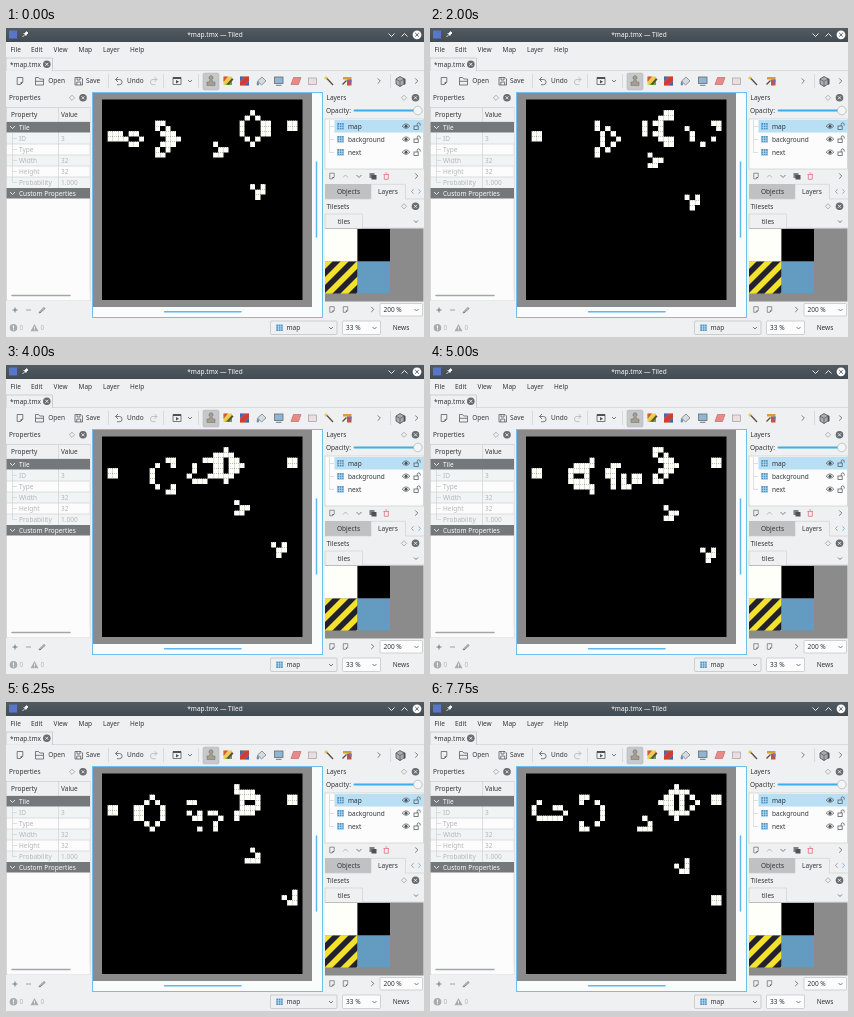
Recreate the animation shown at these times as an HTML page with a canvas. Size 418 by 309 pixels, loop 8000 ms.

```html
<!DOCTYPE html>
<html lang="en">
<head>
<meta charset="utf-8">
<title>Tile map life</title>
<style>
html, body { margin: 0; width: 100%; height: 100%; overflow: hidden; background: #eff0f1; }
svg, canvas { position: absolute; display: block; }
svg { left: 0; top: 0; }
canvas { left: 96px; top: 71px; width: 201px; height: 202px; }
text { font: 6.5px "Noto Sans", sans-serif; fill: #31363b; }
.dim text, text.dim { fill: #b4b6b8; }
text.w { fill: #fcfcfc; }
.mid { text-anchor: middle; }
.ln { fill: none; stroke: #5a5f64; stroke-width: .8; }
.soft { fill: none; stroke: #c9cbcd; stroke-width: .6; }
.box { fill: #fcfcfc; stroke: #c3c5c7; stroke-width: .6; }
.btn { fill: #eff0f1; stroke: #b4b7b9; stroke-width: .6; }
.edit { fill: #fcfcfc; stroke: #b4b7b9; stroke-width: .6; }
.row { fill: #74787b; }
</style>
</head>
<body>
<svg width="418" height="309" viewBox="0 0 418 309">
  <defs>
    <linearGradient id="bar" x2="0" y2="1">
      <stop stop-color="#525b62"/><stop offset="1" stop-color="#424b52"/>
    </linearGradient>
    <pattern id="stripes" width="16" height="16" patternUnits="userSpaceOnUse" x="319" y="233">
      <rect width="16" height="16" fill="#f3e12c"/>
      <path d="M0 8L8 0H16L0 16ZM16 8V16H8Z" fill="#22222e"/>
    </pattern>
    <g id="close">
      <circle r="3.8" fill="#676c70"/>
      <path d="M-1.5-1.5L1.5 1.5M1.5-1.5L-1.5 1.5" stroke="#fff" stroke-width=".8"/>
    </g>
    <path id="float" class="ln" d="M0-2.6L2.6 0L0 2.6L-2.6 0Z" style="stroke:#85898c;stroke-width:.6"/>
    <path id="right" class="ln" d="M-1.3-2.6L1.3 0L-1.3 2.6"/>
    <path id="down" class="ln" d="M-2-1L0 1L2-1"/>
    <g id="page">
      <path class="ln" d="M-2.8-3.5H2.8V1.2L.5 3.5H-2.8Z"/>
      <path d="M2.8 1.2H.5V3.5Z" fill="#4d5257"/>
    </g>
    <g id="grid">
      <rect x="-3.2" y="-3.2" width="6.4" height="6.4" fill="#4a90c2"/>
      <path d="M-3.2-1H3.2M-3.2 1.2H3.2M-1-3.2V3.2M1.2-3.2V3.2" stroke="#d2e9f6" stroke-width=".6"/>
    </g>
    <g id="flags">
      <path class="ln" d="M-3.8 0Q0-4.6 3.8 0Q0 4.2-3.8 0Z"/>
      <circle r="1.5" fill="#4d5257"/>
      <rect class="ln" x="8" y="-.2" width="4.2" height="3.4"/>
      <path class="ln" d="M11.2-.2V-1.8A1.5 1.5 0 0 1 14.2-1.8V-.6"/>
    </g>
  </defs>

  <rect width="418" height="309" fill="#eff0f1"/>

  <!-- title and menu -->
  <rect width="418" height="14" fill="url(#bar)"/>
  <rect x="3" y="2.5" width="8" height="8" fill="#5877c8"/>
  <path d="M16.5 9L19 6.5M17.6 5.2L20.4 8M18.6 5.6L20.6 3.6L22 5L20 7Z" stroke="#fcfcfc" stroke-width=".8" fill="#fcfcfc"/>
  <text class="w mid" x="209" y="9.2">*map.tmx — Tiled</text>
  <path d="M382.5 5.5L385.5 8.5L388.5 5.5M395.5 8.5L398.5 5.5L401.5 8.5" fill="none" stroke="#fcfcfc" stroke-width=".9"/>
  <circle cx="411" cy="6.8" r="4.4" fill="#fcfcfc"/>
  <path d="M409.2 5L412.8 8.6M412.8 5L409.2 8.6" stroke="#475057" stroke-width=".9"/>
  <text x="4.5" y="24.4">File</text><text x="25" y="24.4">Edit</text>
  <text x="47.5" y="24.4">View</text><text x="72.5" y="24.4">Map</text>
  <text x="97" y="24.4">Layer</text><text x="124" y="24.4">Help</text>

  <!-- document tab -->
  <path class="soft" d="M0 42.5H418"/>
  <path d="M0 42.8V30H46.5V42.8" class="btn"/>
  <text x="4" y="38.7">*map.tmx</text>
  <use href="#close" x="40.8" y="36.3"/>

  <!-- toolbar -->
  <use href="#page" x="14" y="53"/>
  <path class="ln" d="M29.5 57V49.5H32.5L33.8 51H37.5V57ZM29.5 53.3H37.5"/>
  <text x="42.3" y="55.3">Open</text>
  <path class="ln" d="M69 49.5H75L76.5 51V57H69ZM71 49.5V52H74V49.5M70.8 57V54H74.7V57"/>
  <text x="80" y="55.3">Save</text>
  <path class="soft" d="M102.5 46V60M157.5 46V60M192.5 46V60"/>
  <path class="ln" d="M112 49L109.5 51.5L112 54M109.5 51.5H113.5A2.6 2.6 0 0 1 113.5 56.7H111"/>
  <text x="121" y="55.3">Undo</text>
  <path class="ln" style="stroke:#b4b7b9" d="M148.5 49L151 51.5L148.5 54M151 51.5H147A2.6 2.6 0 0 0 147 56.7H149.5"/>
  <path class="ln" d="M167 49.5H175V56.5H167Z"/><path d="M167 49H175V51H167ZM170 52L173 53.7L170 55.5Z" fill="#4d5257"/>
  <use href="#down" x="184" y="53"/>
  <rect x="197" y="45" width="16" height="17" rx="1.5" fill="#c6c9cb" stroke="#adb0b2" stroke-width=".5"/>
  <path d="M203.4 54L204 51.5A2 2 0 1 1 206 51.5L206.600 54H209V57.500H201V54Z" fill="#a79f8d" stroke="#6f6a60" stroke-width=".5"/>
  <path d="M217.5 48.500H226V57H217.5Z" fill="#e9cf4b"/>
  <path d="M217.5 48.500H222L217.5 54Z" fill="#d8553f"/><path d="M226 51V57H219Z" fill="#5faa50"/>
  <path d="M221 56L226 50L227.500 51.500L222.500 57Z" fill="#6a4a35"/>
  <path d="M234 48.500H243V57.500H234Z" fill="#e9b83a"/>
  <path d="M234 48.500H239L234 53.500Z" fill="#4466b8"/><path d="M239 48.500H243V53L238 57.500H234V53.500Z" fill="#cf3e35"/>
  <path d="M243 53V57.500H238Z" fill="#3f62b5"/>
  <path d="M251.500 53L256 49L260 53L255.500 57Z" fill="#d5dade" stroke="#70767b" stroke-width=".7"/>
  <path d="M251.500 53Q249.500 57.500 252 57.500Q254 57 252.500 54Z" fill="#6c8fae"/>
  <rect x="268.500" y="49" width="8.500" height="6.500" fill="#8fb5d3" stroke="#666c71" stroke-width=".8"/>
  <path d="M270 57.300H275.500" stroke="#666c71" stroke-width=".9"/>
  <path d="M287.500 49.500H295L292.500 56.500H285Z" fill="#e88a88" stroke="#c05d5d" stroke-width=".6"/>
  <rect x="302.500" y="50" width="8" height="6.500" fill="#eadfe0" stroke="#a99b9e" stroke-width=".7"/>
  <path d="M320.500 50L327 57" stroke="#5b4c43" stroke-width="1.300"/>
  <path d="M320 48V52M318 50H322" stroke="#e5bb33" stroke-width=".8"/>
  <path d="M337 49H345.500V51.500H337Z" fill="#dc9c35"/>
  <path d="M341 51.500H345.500V57.500H341Z" fill="#c8504a"/><path d="M343.300 51.500H345.500V54.500H343.300Z" fill="#5877c8"/>
  <path d="M336.500 56.500L340.500 52.500" stroke="#5b4c43" stroke-width="1.200"/>
  <use href="#right" x="373" y="53"/>
  <path class="soft" d="M384.500 46V60"/>
  <path d="M390 51L394 48.500L398 51V56L394 58.500L390 56Z" fill="#a9adb0" stroke="#4d5257" stroke-width=".8"/>
  <path class="ln" d="M390 51L394 53.500L398 51M394 53.500V58.500"/>
  <path d="M396 49L399.500 51V56L398 57V51Z" fill="#4d5257"/>
  <use href="#right" x="410.5" y="53"/>

  <!-- properties -->
  <text x="3" y="72.3">Properties</text>
  <use href="#float" x="66" y="69.8"/><use href="#close" x="77" y="69.8"/>
  <rect x=".5" y="79.5" width="83.500" height="193" class="box"/>
  <rect x="1" y="80" width="82.500" height="13.500" fill="#eff0f1"/>
  <text x="5" y="89.200">Property</text><text x="55" y="89.200">Value</text>
  <path d="M1 105H83.5V116H1ZM1 127H83.5V138H1ZM1 149H83.5V160H1Z" fill="#f1f4f5"/>
  <path class="soft" d="M52.5 80V160M1 93.7H83.5M1 116H83.5M1 127H83.5M1 138H83.5M1 149H83.5"/>
  <path class="soft" d="M6.5 105V154.500M6.500 110.500H11M6.500 121.500H11M6.500 132.500H11M6.500 143.500H11M6.500 154.500H11"/>
  <path class="row" d="M.5 94H84V104.500H.5ZM.5 160H84V170.500H.5Z"/>
  <path d="M4 98L6.500 100.500L9 98M4 164L6.500 166.500L9 164" fill="none" stroke="#fcfcfc" stroke-width=".8"/>
  <text class="w" x="13" y="101.600">Tile</text><text class="w" x="13" y="167.600">Custom Properties</text>
  <g class="dim">
    <text x="13" y="112.700">ID</text><text x="55" y="112.700">3</text>
    <text x="13" y="123.700">Type</text>
    <text x="13" y="134.700">Width</text><text x="55" y="134.700">32</text>
    <text x="13" y="145.700">Height</text><text x="55" y="145.700">32</text>
    <text x="13" y="156.700">Probability</text><text x="55" y="156.700">1.000</text>
  </g>
  <rect x="1" y="263" width="82.500" height="9.500" fill="#fcfcfc"/>
  <path d="M6 267.500H64" stroke="#a3a6a8" stroke-width="1.500" stroke-linecap="round"/>
  <path class="ln" d="M6.500 282H11.500M9 279.500V284.500M33 284.500L38 279.500L39 280.500L34 285Z"/>
  <path class="ln" style="stroke:#8b8e90" d="M20 282H25"/>

  <!-- map view -->
  <rect x="86.500" y="64.500" width="230" height="225" fill="#fafbfb" stroke="#6fc0ea"/>
  <rect x="87" y="65" width="219" height="214" fill="#8b8b8b"/>
  <path d="M310.500 134V209M158.500 283.800H235" stroke="#5dbaec" stroke-width="1.500" stroke-linecap="round"/>

  <!-- layers -->
  <text x="320.500" y="72.300">Layers</text>
  <use href="#float" x="398" y="69.800"/><use href="#close" x="409.500" y="69.800"/>
  <text x="320" y="84.800">Opacity:</text>
  <path d="M348.500 82.500H411" stroke="#3daee9" stroke-width="2" stroke-linecap="round"/>
  <circle cx="411.800" cy="82.500" r="4.300" fill="#f4f5f5" stroke="#a5a8aa" stroke-width=".6"/>
  <rect x="319" y="91" width="98.500" height="50" class="box"/>
  <rect x="328.500" y="92" width="89" height="12.500" fill="#b9dff4"/>
  <path class="soft" d="M323.500 92V124.500M323.500 98.500H328M323.500 111.500H328M323.500 124.500H328"/>
  <use href="#grid" x="334.500" y="98.200"/><use href="#grid" x="334.500" y="111.200"/><use href="#grid" x="334.500" y="124.200"/>
  <text x="342" y="100.600">map</text><text x="342" y="113.600">background</text><text x="342" y="126.600">next</text>
  <use href="#flags" x="400" y="98.200"/><use href="#flags" x="400" y="111.200"/><use href="#flags" x="400" y="124.200"/>
  <use href="#page" transform="translate(326 148) scale(.8)"/>
  <path class="ln" style="stroke:#a5a8aa" d="M337 149.500L339.500 147L342 149.500"/>
  <path class="ln" d="M350.500 147L353 149.500L355.500 147"/>
  <path d="M363.500 145H368.500V150H363.500Z" fill="#7b8084"/><path d="M365.500 147H370.500V151.500H365.500Z" fill="#4d5257"/>
  <path class="ln" style="stroke:#e0757f" d="M377.500 146.500H383M378.300 146.500V151.300H382.300V146.500M379.300 145H381.300"/>
  <use href="#right" x="410.500" y="148"/>
  <rect x="319" y="156" width="46" height="15" fill="#bfc1c2"/>
  <path class="soft" d="M319 171H365V156.300H399.500V171H418"/>
  <text class="mid" x="342.500" y="166">Objects</text><text class="mid" x="382" y="166">Layers</text>
  <path class="ln" style="stroke:#8b8e90" d="M407.500 161.200L405.500 163.500L407.500 165.800"/>
  <path class="ln" style="stroke:#57b5e5" d="M412.500 161.200L414.500 163.500L412.500 165.800"/>

  <!-- tilesets -->
  <text x="320.500" y="180.800">Tilesets</text>
  <use href="#float" x="398" y="178.300"/><use href="#close" x="409.500" y="178.300"/>
  <path class="soft" d="M319 200V186H356.500V200H418"/>
  <text class="mid" x="338" y="195.500">tiles</text>
  <use href="#down" x="410" y="193.500"/>
  <rect x="319" y="200.500" width="98.500" height="73" fill="#8b8b8b"/>
  <rect x="319" y="201" width="32.500" height="32.500" fill="#fffffa"/>
  <rect x="351.500" y="201" width="32.500" height="32.500"/>
  <rect x="319" y="233.500" width="32.500" height="32" fill="url(#stripes)"/>
  <rect x="351.500" y="233.500" width="32.500" height="32" fill="#639cc0"/>
  <use href="#page" transform="translate(326 281.500) scale(.8)"/>
  <use href="#page" transform="translate(339.500 281.500) scale(.8)"/>
  <use href="#right" x="366.500" y="281.500"/>
  <rect x="374" y="275.500" width="42.500" height="12.500" rx="1" class="edit"/>
  <text x="377.500" y="284">200 %</text>
  <use href="#down" x="410.500" y="282"/>

  <!-- status bar -->
  <circle cx="7.500" cy="299.800" r="3.800" fill="#a9acae"/>
  <path d="M7.500 297.500V300.500M7.500 301.200V302.200" stroke="#fff" stroke-width=".9"/>
  <text class="dim" x="13.500" y="302.200">0</text>
  <path d="M28.500 296L32.500 303.300H24.500Z" fill="#a9acae"/>
  <path d="M28.500 298.500V301M28.500 301.600V302.500" stroke="#fff" stroke-width=".7"/>
  <text class="dim" x="34.500" y="302.200">0</text>
  <rect x="264.500" y="293" width="66.500" height="13.500" rx="1" class="btn"/>
  <use href="#grid" x="273.500" y="299.800"/>
  <text x="280.500" y="302.200">map</text>
  <use href="#down" x="325" y="300"/>
  <rect x="336.500" y="293" width="38" height="13.500" rx="1" class="edit"/>
  <text x="340" y="302.200">33 %</text>
  <use href="#down" x="368.500" y="300"/>
  <text class="mid" x="395" y="302.200">News</text>
</svg>
<canvas id="map" width="402" height="404"></canvas>
<script>
const N = 38, TILE = 10.56, STEP = 250, STEPS = 32, WARMUP = 48;
const GUN = [
  "........................O",
  "......................O.O",
  "............OO......OO............OO",
  "...........O...O....OO............OO",
  "OO........O.....O...OO",
  "OO........O...O.OO....O.O",
  "..........O.....O.......O",
  "...........O...O",
  "............OO"
];

// The outermost ring of tiles always stays dead.
function evolve(cells) {
  const next = new Uint8Array(N * N);
  for (let y = 1; y < N - 1; y++) {
    for (let x = 1; x < N - 1; x++) {
      const i = y * N + x;
      let n = -cells[i];
      for (let dy = -N; dy <= N; dy += N) {
        n += cells[i + dy - 1] + cells[i + dy] + cells[i + dy + 1];
      }
      next[i] = n === 3 || (n === 2 && cells[i]) ? 1 : 0;
    }
  }
  return next;
}

let cells = new Uint8Array(N * N);
GUN.forEach((line, y) => [...line].forEach((ch, x) => {
  if (ch === "O") cells[(y + 2) * N + x + 1] = 1;
}));
for (let i = 0; i < WARMUP; i++) cells = evolve(cells);
const states = [cells];
while (states.length < STEPS) states.push(evolve(states[states.length - 1]));

// Drawn at twice the display size so that tiles land on half pixels.
const ctx = document.getElementById("map").getContext("2d");
const edge = i => Math.round(i * TILE);

function draw(state) {
  ctx.setTransform(1, 0, 0, 1, 0, 0);
  ctx.clearRect(0, 0, 402, 404);
  ctx.translate(0, 1);
  ctx.fillStyle = "#000";
  ctx.fillRect(0, 0, edge(N), edge(N));
  ctx.fillStyle = "#fffffa";
  state.forEach((on, i) => {
    if (!on) return;
    const x = i % N, y = (i - x) / N;
    ctx.fillRect(edge(x), edge(y), edge(x + 1) - edge(x), edge(y + 1) - edge(y));
  });
  ctx.strokeStyle = "rgba(0,0,0,.5)";
  ctx.setLineDash([2, 2]);
  ctx.beginPath();
  for (let i = 1; i < N; i++) {
    const p = edge(i) + .5;
    ctx.moveTo(p, 0);
    ctx.lineTo(p, edge(N));
    ctx.moveTo(0, p);
    ctx.lineTo(edge(N), p);
  }
  ctx.stroke();
}

let shown = -1;
function tick() {
  const k = Math.floor(performance.now() / STEP) % STEPS;
  if (k !== shown) draw(states[shown = k]);
  requestAnimationFrame(tick);
}
tick();
</script>
</body>
</html>
```
